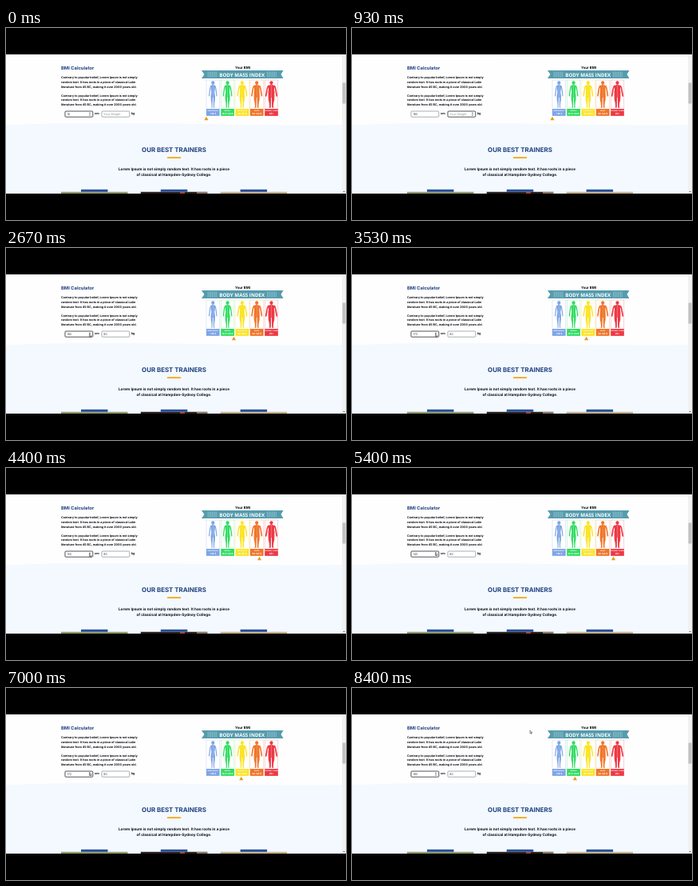
An HTML page for the animation above (8470 ms loop, 426 px wide and 240 px high).

```html
<!DOCTYPE html>
<html lang="en">
<head>
<meta charset="utf-8">
<title>BMI Calculator</title>
<style>
  html, body { margin: 0; width: 100%; height: 100%; overflow: hidden; background: #000; }
  svg { display: block; width: 100%; height: 100%; }
  text { font-family: Inter, "Open Sans", sans-serif; font-weight: 700; fill: #0b0d12; text-rendering: geometricPrecision; }
  .navy { fill: #204080; }
  .mid { text-anchor: middle; }
  .copy { font-size: 3.72px; }
  .field { font-size: 3.7px; font-weight: 400; fill: #444; }
  .ribbon { font-family: "Open Sans", "Noto Sans", sans-serif; font-size: 6.2px; fill: #fff; }
  .label { font-size: 1.9px; fill: #fff; }
  .range { font-size: 2.9px; fill: #fff; }
</style>
</head>
<body>
<svg id="stage" viewBox="0 0 426 240" xmlns="http://www.w3.org/2000/svg">
  <rect width="426" height="240"/>
  <rect y="33" width="426" height="174" fill="#fefefe"/>
  <path d="M188 33H421V37L188 36Z" fill="#f9fcff"/>
  <path d="M0 121.5C70 118 150 118.5 215 119.5S360 122.5 426 121V207H0Z" fill="#f3f9ff"/>

  <text class="navy" x="69" y="52" font-size="5.8">BMI Calculator</text>
  <g id="copy"></g>
  <g id="fields"></g>
  <text x="111" y="107.6" font-size="3.8">cm</text>
  <text x="157" y="107.6" font-size="3.8">kg</text>

  <text class="mid" x="296.5" y="50.8" font-size="4.35">Your BMI</text>
  <path d="M245 53H347.5L344.5 58L347.5 63H245L248.5 58Z" fill="#559bad"/>
  <path id="stripes" stroke="#8ec3ce" stroke-width=".8"/>
  <text class="ribbon mid" x="295.7" y="61">BODY MASS INDEX</text>
  <g id="chart"></g>
  <path id="marker" d="M0 110.8L2.6 115.2H-2.6Z" fill="#eb9a18"/>

  <text class="navy mid" x="210.5" y="155.4" font-size="7.9">OUR BEST TRAINERS</text>
  <rect x="202" y="161.2" width="17" height="1.8" fill="#f5a81c"/>
  <text class="mid" x="210.5" y="178.4" font-size="4.7">Lorem Ipsum is not simply random text. It has roots in a piece</text>
  <text class="mid" x="210.5" y="185.3" font-size="4.7">of classical at Hampden-Sydney College.</text>
  <g id="trainers"></g>

  <rect x="421" y="33" width="5" height="174" fill="#f1f1f1"/>
  <rect x="421.5" y="68.5" width="4" height="26" fill="#c1c1c1"/>
  <path d="M422.3 204H424.7L423.5 205.5Z" fill="#555"/>
  <path id="cursor" d="M0 0V3.8L.9 3L1.5 4.4L2.2 4.1L1.6 2.7H2.8Z" fill="#fff" stroke="#222" stroke-width=".5"/>
</svg>
<script>
const LOOP = 8470;
const byId = id => document.getElementById(id);
const text = (cls, x, y, value) => `<text class="${cls}" x="${x}" y="${y}">${value}</text>`;
const rect = (x, y, w, h, fill) => `<rect x="${x}" y="${y}" width="${w}" height="${h}" fill="${fill}"/>`;
const clamp = (v, lo, hi) => Math.min(hi, Math.max(lo, v));

const lines = [
  "Contrary to popular belief, Lorem Ipsum is not simply",
  "random text. It has roots in a piece of classical Latin",
  "literature from 45 BC, making it over 2000 years old."
];
byId("copy").innerHTML = [63.3, 85.8].map(top =>
  lines.map((line, i) => text("copy", 69, top + i * 5.6, line)).join("")).join("");

byId("stripes").setAttribute("d", [253, 327.5].map(x =>
  Array.from({ length: 7 }, (_, i) => `M${x + i * 1.8} 54.5V61.5`).join("")).join(""));

// Half of a body: torso with leg, plus a separate arm; girth widens both.
function figure(cx, girth, color) {
  const w = v => (v * girth).toFixed(2);
  const half = `<path d="M0 69H.9V71L${w(2.8)} 72L${w(2.4)} 77L${w(1.9 * girth)} 80L${w(2.7)} 85
    Q${w(2.8)} 90 ${w(2)} 93L${w(1.6)} 98L${w(2.1)} 99.8H.7L.4 87H0Z"/>
    <path d="M${w(2.8)} 72.6Q${w(3.7)} 75 ${w(4)} 79L${w(4.7)} 84.8" fill="none"
      stroke="${color}" stroke-width="${w(1.2)}" stroke-linecap="round"/>`;
  return `<g transform="translate(${cx})" fill="${color}"><circle cy="68.4" r="2.1"/>${half}<g transform="scale(-1 1)">${half}</g></g>`;
}

const groups = [
  ["#7ea5e6", "UNDERWEIGHT", "&lt;18.5"],
  ["#31dc62", "NORMAL", "18.5-24.9"],
  ["#fbe426", "OVERWEIGHT", "25-29.9"],
  ["#f1762a", "OBESE", "30-34.9"],
  ["#ee3944", "EXTREMELY OBESE", "35&lt;"]
];
byId("chart").innerHTML = groups.map(([color, name, range], i) => {
  const x = 251 + i * 18.3, cx = x + 8.3;
  return `<rect x="${x}" y="65" width="16.6" height="44.5" fill="#fff" stroke="${color}" stroke-opacity=".45" stroke-width=".5"/>`
    + figure(cx, 1 + i * .11, color) + rect(x, 101, 16.6, 8.8, color)
    + text("label mid", cx, 104.2, name) + text("range mid", cx, 108.1, range);
}).join("");

byId("trainers").innerHTML = ["#8f9b70", "#2b2220", "#c5b493"].map((color, i) => {
  const x = 69 + i * 99.8;
  return rect(x, 204.8, 83.5, 2.2, color) + rect(x + 25, 201.8, 33.5, 3, "#2a4f97");
}).join("") + rect(218, 205, 6, 2, "#a5493a") + rect(239, 205, 13, 2, "#8b7962");

byId("fields").innerHTML = [74, 120].map((x, i) =>
  `<rect id="box${i}" x="${x}" y="104" width="34.8" height="7.2" rx="1" fill="#fff"/>
   <text id="value${i}" class="field" x="${x + 2.2}" y="108.9"></text>
   <path id="spin${i}" d="M${x + 29.8} 107.1L${x + 31} 105.6L${x + 32.2} 107.1ZM${x + 29.8} 108.2L${x + 31} 109.7L${x + 32.2} 108.2Z" fill="#666"/>`).join("");

// Held spinner buttons step twenty times a second.
function heightAt(t) {
  if (t < 130) return 18;
  if (t < 2700) return 180;
  if (t < 5450) return t < 3200 ? 179 : Math.max(145, 179 - Math.floor((t - 3200) / 50));
  return clamp(146 + Math.floor((t - 5700) / 50), 146, 185);
}
const weightAt = t => t < 1200 ? 0 : t < 1450 ? 8 : 80;

const scale = [[18.5, 259], [23.4, 279.5], [24.7, 285.5], [26.7, 293.5], [33.3, 317.5], [38.05, 327.5]];
function markerX(bmi) {
  if (bmi < 18.5) return 251;
  const i = clamp(scale.findIndex(([b]) => b >= bmi), 1, scale.length - 1);
  const [b0, x0] = scale[i - 1], [b1, x1] = scale[i];
  return x0 + (x1 - x0) * (bmi - b0) / (b1 - b0);
}

const path = [[1800, 151, 108], [2550, 104.5, 107.2], [5250, 104.5, 107.2], [5400, 104.5, 105.5], [7650, 104.5, 105.5], [8250, 223, 53]];
function cursorAt(t) {
  const i = path.findIndex(p => p[0] > t);
  if (i < 0) return path[path.length - 1].slice(1);
  if (i === 0) return path[0].slice(1);
  const [t0, x0, y0] = path[i - 1], [t1, x1, y1] = path[i];
  const p = (t - t0) / (t1 - t0), k = p * p * (3 - 2 * p);
  return [x0 + (x1 - x0) * k, y0 + (y1 - y0) * k];
}

function draw(t) {
  const height = heightAt(t), weight = weightAt(t);
  const focus = t > 800 && t < 2650 ? 1 : 0;
  [height, weight].forEach((value, i) => {
    const box = byId("box" + i), label = byId("value" + i);
    box.setAttribute("stroke", focus === i ? "#34363c" : "#858b96");
    box.setAttribute("stroke-width", focus === i ? .85 : .7);
    label.textContent = value || "Your Weight";
    label.style.fill = value ? "#444" : "#8b8f98";
    byId("spin" + i).setAttribute("visibility", focus === i ? "visible" : "hidden");
  });
  const bmi = height > 100 ? weight / (height / 100) ** 2 : 0;
  byId("marker").setAttribute("transform", `translate(${markerX(bmi)})`);
  const cursor = byId("cursor");
  cursor.setAttribute("transform", `translate(${cursorAt(t)})`);
  cursor.setAttribute("visibility", t < 1900 ? "hidden" : "visible");
}

const start = performance.now();
function tick() {
  draw((performance.now() - start) % LOOP);
  requestAnimationFrame(tick);
}
tick();
</script>
</body>
</html>
```
